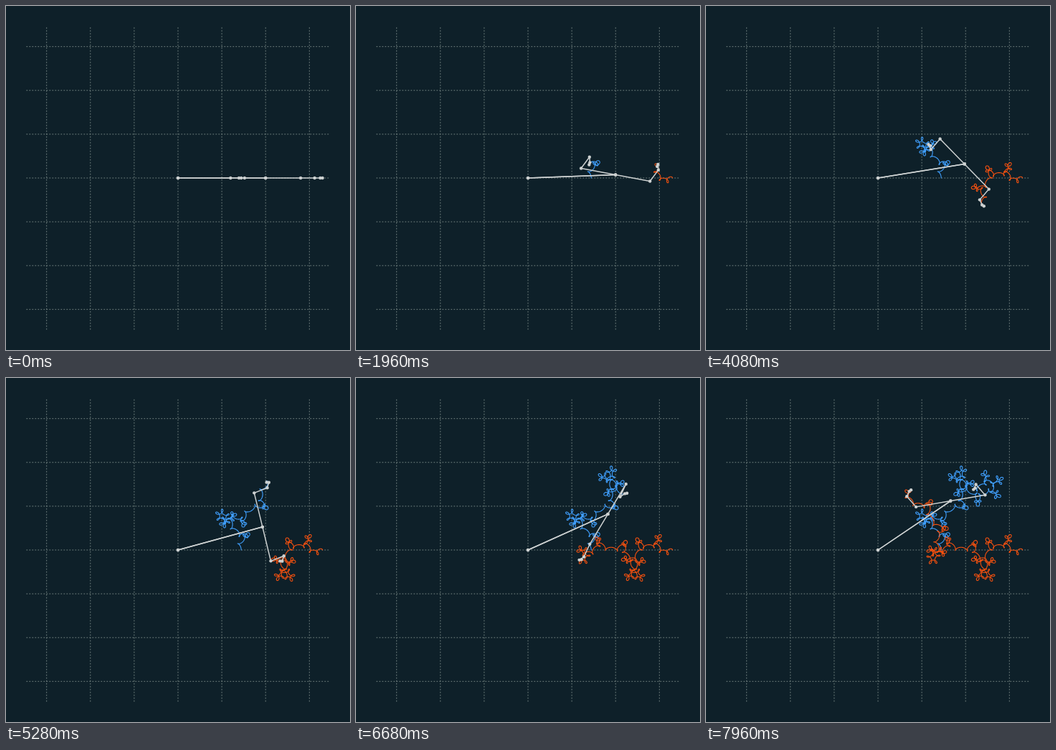
An HTML page with a canvas for the animation above (8000 ms loop, 480 by 480 pixels).

```html
<!DOCTYPE html>
<html>
<head>
<meta charset="utf-8">
<style>
  html, body { margin: 0; width: 100%; height: 100%; overflow: hidden; background: #0e2029; }
  canvas { display: block; }
</style>
</head>
<body>
<canvas id="stage" width="480" height="480"></canvas>
<script>
const ctx = document.getElementById('stage').getContext('2d');
const CENTER = 240, EXTENT = 211.2, UNIT = EXTENT / 3.456;
const LOOP = 8000, FRAME = 40, FULL_TURN = 40000;
const RATIO = 0.4, SPEED = -5, ARMS = 5;
const TRACE_STEP = 0.0003;
const ARM_COLOR = '#cdd1d1', GRID_COLOR = '#71807f';
const chains = [
  { side: -1, color: '#40a0ff' },
  { side: 1, color: '#f4500f' }
];

// Each arm is 0.4 times as long as the one before and turns -5 times as fast.
function joints(theta, side) {
  let x = CENTER, y = CENTER;
  const points = [[x, y]];
  for (let k = 0; k < ARMS; k++) {
    const length = 2 * UNIT * (side * RATIO) ** k;
    const angle = theta * SPEED ** k;
    x += length * Math.cos(angle);
    y -= length * Math.sin(angle);
    points.push([x, y]);
  }
  return points;
}

function strokePath(points, color, width) {
  ctx.beginPath();
  points.forEach(([x, y]) => ctx.lineTo(x, y));
  ctx.strokeStyle = color;
  ctx.lineWidth = width;
  ctx.stroke();
}

function drawGrid() {
  ctx.fillStyle = '#0e2029';
  ctx.fillRect(0, 0, 480, 480);
  ctx.setLineDash([1, 3]);
  const low = CENTER - EXTENT, high = CENTER + EXTENT;
  for (let i = -3; i <= 3; i++) {
    const at = CENTER + i * UNIT;
    strokePath([[at, high], [at, low]], GRID_COLOR, 1);
    strokePath([[low, at], [high, at]], GRID_COLOR, 1);
  }
  ctx.setLineDash([]);
}

function drawTrace(theta, { side, color }) {
  const tips = [];
  for (let a = 0; a < theta; a += TRACE_STEP) tips.push(joints(a, side)[ARMS]);
  tips.push(joints(theta, side)[ARMS]);
  strokePath(tips, color, 1.1);
}

function drawArms(theta, { side }) {
  const points = joints(theta, side);
  strokePath(points, ARM_COLOR, 1.5);
  ctx.fillStyle = ARM_COLOR;
  for (const [x, y] of points) {
    ctx.beginPath();
    ctx.arc(x, y, 2.2, 0, 2 * Math.PI);
    ctx.fill();
  }
}

function draw(now) {
  const time = Math.floor((now % LOOP) / FRAME) * FRAME;
  const theta = Math.PI * (1 - Math.cos(Math.PI * time / FULL_TURN));
  drawGrid();
  chains.forEach(chain => drawTrace(theta, chain));
  chains.forEach(chain => drawArms(theta, chain));
}

ctx.lineJoin = 'round';
ctx.lineCap = 'round';
let start;
function tick(now) {
  start ??= now;
  draw(now - start);
  requestAnimationFrame(tick);
}
requestAnimationFrame(tick);
</script>
</body>
</html>
```
